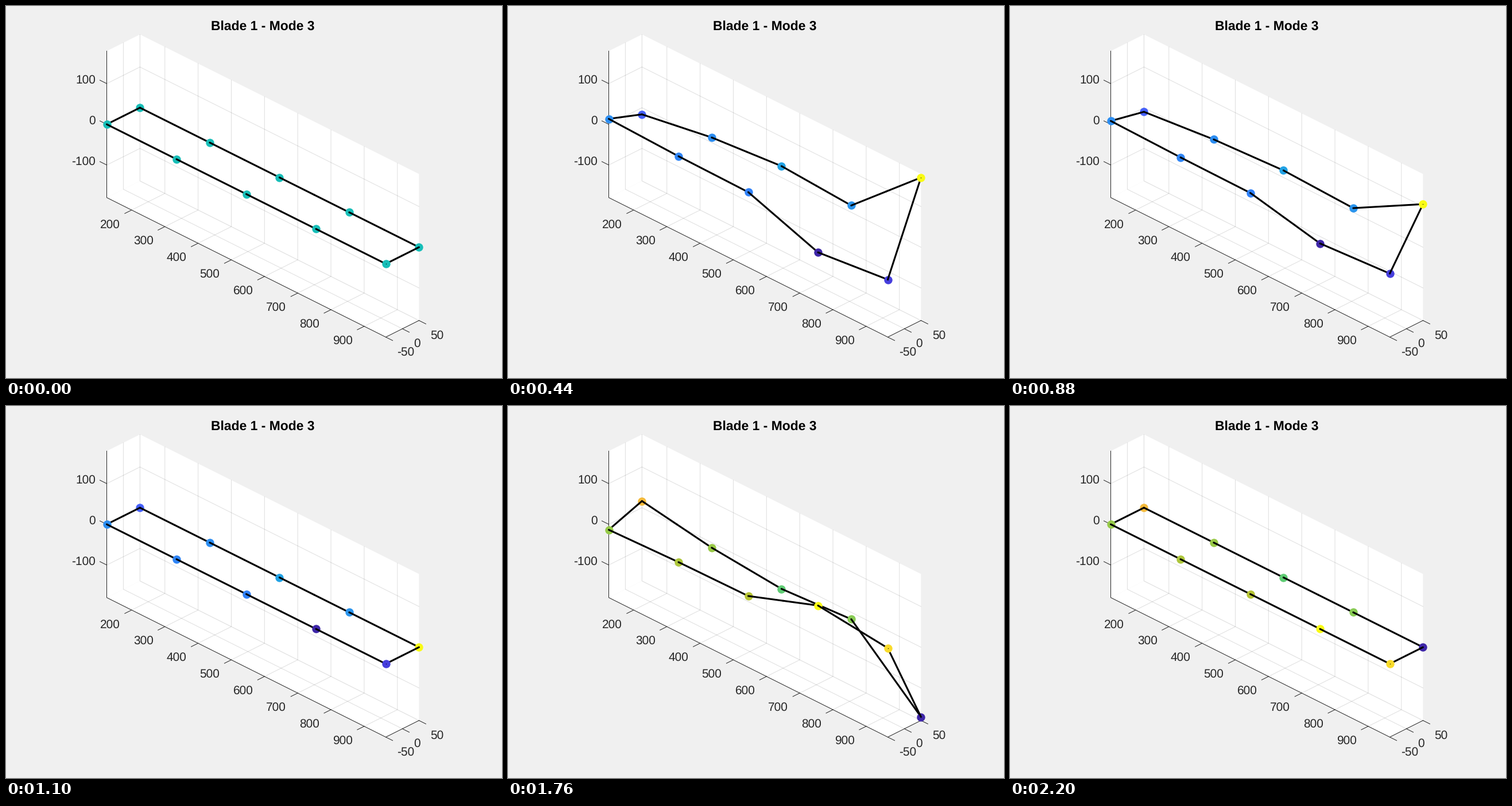
These frames come from a looping animation (864x648 px, 2310 ms). A matplotlib script:

```python
import numpy as np
import matplotlib.pyplot as plt
from matplotlib.animation import FuncAnimation
from matplotlib.colors import LinearSegmentedColormap

W, H = 864, 648
STEPS = 20
X0, X1, Y0, Y1, ZMAX = 125, 965, -50, 50, 180
INK = "#262626"

plt.rcParams["font.family"] = "Liberation Sans"
plt.rcParams["text.hinting"] = "none"

SHADES = ("3E26A8 4537D5 484DF0 4563FD 327CFC 2B91EF 20A5E3 08B5D0 19BFB6 "
          "37C897 64CD6F 9DC943 D1BF27 F8BA3D FCCF30 F5E924 F9FB15").split()
STOPS = np.append(np.arange(0, 64, 4), 63) / 63
cmap = LinearSegmentedColormap.from_list(
    "blade", [(s, "#" + c) for s, c in zip(STOPS, SHADES)], N=256)


def project(x, y, z):
    """Orthographic view, azimuth 45, elevation 30, in pixels."""
    u, v = x - X0, y - Y0
    return 175 + 0.5786 * (u + v), 205.6 + 0.2893 * (u - v) - 0.709 * z


def depth(p):
    return 2000 + 0.612 * (p[0] - p[1]) + 0.5 * p[2]


fig = plt.figure(figsize=(W / 72, H / 72), dpi=72, facecolor="#F0F0F0")
ax = fig.add_axes([0, 0, 1, 1])
ax.set_xlim(-0.5, W - 0.5)
ax.set_ylim(H - 0.5, -0.5)
ax.axis("off")


def path(*points, **style):
    ax.plot(*zip(*[project(*p) for p in points]), **style)


def wall(*points):
    ax.fill(*zip(*[project(*p) for p in points]), color="white", lw=0, zorder=1)


def grid(*points):
    path(*points, color=INK, alpha=0.15, lw=1, zorder=2)


def tick(point, dx, dy):
    x, y = project(*point)
    ax.plot([x, x + dx], [y, y + dy], color=INK, lw=1, zorder=3)
    return x, y


def label(x, y, value, align):
    s, size = str(value), 20.83
    width = size * sum(0.333 if c == "-" else 0.556 for c in s)
    ax.text(x - align * width, y + 7.4, s, size=size, color=INK, va="baseline")


# Walls and floor
wall((X0, Y0, -ZMAX), (X0, Y1, -ZMAX), (X0, Y1, ZMAX), (X0, Y0, ZMAX))
wall((X0, Y1, -ZMAX), (X1, Y1, -ZMAX), (X1, Y1, ZMAX), (X0, Y1, ZMAX))
wall((X0, Y0, -ZMAX), (X1, Y0, -ZMAX), (X1, Y1, -ZMAX), (X0, Y1, -ZMAX))

# Grid, ticks and labels
for x in range(200, 1000, 100):
    grid((x, Y0, -ZMAX), (x, Y1, -ZMAX), (x, Y1, ZMAX))
    px, py = tick((x, Y0, -ZMAX), -12, 6)
    label(px - 37.5, py + 23.5, x, 0.5)
for y in (-50, 0, 50):
    if y > Y0:
        grid((X1, y, -ZMAX), (X0, y, -ZMAX), (X0, y, ZMAX))
    px, py = tick((X1, y, -ZMAX), 12, 6)
    label(px + 19.3, py + 24.5, y, 0)
for z in (-100, 0, 100):
    grid((X0, Y0, z), (X0, Y1, z), (X1, Y1, z))
    px, py = tick((X0, Y0, z), -12, -6)
    label(px - 19.5, py - 8, z, 1)
path((X0, Y0, ZMAX), (X0, Y0, -ZMAX), (X1, Y0, -ZMAX), (X1, Y1, -ZMAX),
     color=INK, lw=1, zorder=3)
ax.text(356.6, 41.5, "Blade 1 - Mode 3", size=22.9, weight="bold",
        color="black", va="baseline")

# Blade outline: front edge out, back edge home
span = np.linspace(X0, X1, 5)
node_x = np.concatenate([span, span[::-1]])
node_y = np.repeat([Y0, Y1], 5)
mode = np.array([14.1, 7.6, 5, -60.5, -40.7, 180, 17.7, 29.4, 13.2, -17.2])
share = (mode - mode.min()) / np.ptp(mode)
count = len(mode)

dots = [ax.plot([], [], "o", ms=14.4, mew=0)[0] for _ in mode]
pins = [ax.plot([], [], "o", ms=1.3, mew=0, color="black")[0] for _ in mode]
halves = [ax.plot([], [], color="black", lw=3.1, solid_capstyle="round")[0]
          for _ in range(2 * count)]


def place(line, points, z):
    line.set_data(*zip(*[project(*p) for p in points]))
    line.set_zorder(z)


def draw(k):
    swing = np.sin(2 * np.pi * k / STEPS)
    nodes = np.column_stack([node_x, node_y, mode * swing])
    if k == 0:
        level = np.full(count, 0.5)
    else:
        level = share if k <= STEPS // 2 else 1 - share
    for i, p in enumerate(nodes):
        place(dots[i], [p], depth(p))
        dots[i].set_color(cmap(level[i]))
        place(pins[i], [p], depth(p) + 0.01)
        # half segments sort in front of or behind the node they touch
        for j, step in enumerate((-1, 1)):
            mid = (p + nodes[(i + step) % count]) / 2
            place(halves[2 * i + j], [p, mid], depth((p + mid) / 2))
    return dots + pins + halves


anim = FuncAnimation(fig, draw, frames=STEPS + 1, interval=110,
                     repeat=True, repeat_delay=0, blit=False)
plt.show()
```
